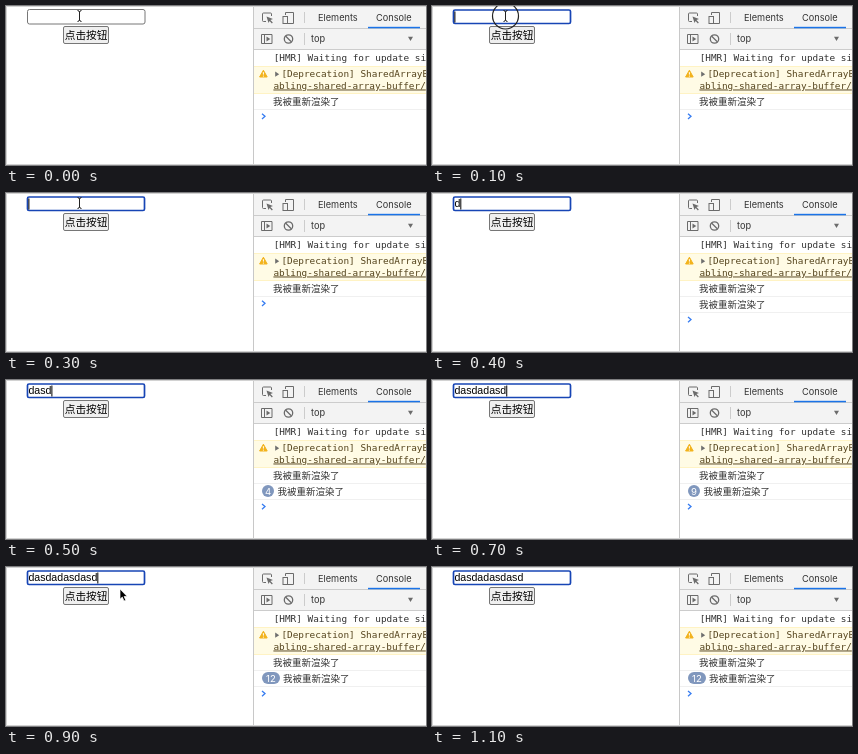
An HTML page for the animation above (1200 ms loop, 420 by 159 pixels).

```html
<!DOCTYPE html>
<html lang="zh">
<head>
<meta charset="utf-8">
<title>Input re-render demo</title>
<style>
  html, body { margin: 0; width: 100%; height: 100%; overflow: hidden; background: #fff; }
  svg { display: block; width: 420px; height: 159px; }
  text { white-space: pre; }
  .ui { font: 9.2px Inter, Roboto, sans-serif; fill: #333; }
  .mono { font: 9.4px "DejaVu Sans Mono", monospace; fill: #303030; }
  .log { font: 9.5px "Noto Sans CJK SC", "Noto Sans CJK", sans-serif; fill: #303030; }
  .button { font: 10.7px "Noto Sans CJK SC", "Noto Sans CJK", sans-serif; fill: #000; }
  .typed { font: 10.6px "Liberation Sans", Arial, sans-serif; fill: #000; }
  .count { font: 9.6px Inter, "Liberation Sans", sans-serif; fill: #fff; text-anchor: middle; }
  .icon { fill: none; stroke: #6b6b6b; stroke-width: 1; }
  .warn { fill: #54431c; }
</style>
</head>
<body>
<svg viewBox="0 0 420 159">
  <rect width="420" height="159" fill="#fff"/>

  <!-- Developer tools -->
  <rect x="248" width="172" height="43" fill="#f3f3f3"/>
  <path d="M248 22.5H420M248 43.5H420M298.5 6V17M298.5 27V39" stroke="#ccc" fill="none"/>
  <g class="icon">
    <path d="M260 15.5H257.5Q256.5 15.5 256.5 14.5V8Q256.5 7 257.5 7H264.5Q265.5 7 265.5 8V10"/>
    <path d="M260.5 10.5L267 13L264.4 14L266.8 16.6L265.9 17.4L263.6 14.9L262.5 17Z" fill="#6b6b6b" stroke="none"/>
    <path d="M279.5 9V6.5H287.5V17.5H281.5"/>
    <rect x="277" y="10.5" width="4.5" height="7"/>
    <path d="M255.5 28.5H266V37.5H255.5ZM258.5 28.5V37.5"/>
    <path d="M260.5 30.5L264.3 33L260.5 35.5Z" fill="#6b6b6b" stroke="none"/>
    <g stroke-width="1.3">
      <circle cx="282.5" cy="33" r="4.2"/>
      <path d="M279.5 30L285.5 36"/>
    </g>
  </g>
  <text class="ui" x="312" y="14.7">Elements</text>
  <text class="ui" x="370" y="14.7">Console</text>
  <rect x="362" y="20.8" width="52" height="1.5" fill="#1a73e8"/>
  <text class="ui" x="305" y="36">top</text>
  <path d="M402 30.7H407L404.5 35Z" fill="#6b6b6b"/>

  <text class="mono" x="267.7" y="55">[HMR] Waiting for update signal</text>
  <rect x="248" y="60" width="172" height="28" fill="#fffbe5"/>
  <path d="M248 60.5H420M248 87.5H420" stroke="#fff3c4"/>
  <path d="M257.4 64.2L261.2 71H253.6Z" fill="#f2b21b" stroke="#f2b21b" stroke-linejoin="round"/>
  <path d="M257.4 66.2V68.6M257.4 69.6V70.6" stroke="#fff"/>
  <path d="M269.2 65.6L273.2 68.2L269.2 70.8Z" fill="#6e6e6e"/>
  <text class="mono warn" x="275.4" y="71.3">[Deprecation] SharedArrayBuffer</text>
  <text class="mono warn" x="267.4" y="82.5" text-decoration="underline">abling-shared-array-buffer/</text>
  <text class="log" x="267" y="98.5">我被重新渲染了</text>
  <path d="M248 103.5H420" stroke="#f0f0f0"/>
  <g id="row">
    <rect id="badge" x="256" y="105" width="12" height="12" rx="6" fill="#8097bd"/>
    <text id="count" class="count" y="114.5"></text>
    <text id="log" class="log" y="114.5">我被重新渲染了</text>
    <path d="M248 119.5H420" stroke="#f0f0f0"/>
  </g>
  <path id="prompt" d="M256 107.7L259 110.3L256 112.9" fill="none" stroke="#367cf1" stroke-width="1.3"/>

  <!-- Page -->
  <rect id="field" fill="#fff"/>
  <text id="typed" class="typed" x="22.4" y="14.3"></text>
  <rect id="caret" y="5.5" width="1" height="11"/>
  <rect x="57.5" y="20.5" width="45" height="17" rx="1.5" fill="#efefef" stroke="#767676"/>
  <text class="button" x="58.7" y="33">点击按钮</text>
  <path d="M247.5 0V159" stroke="#c8c8c8"/>
  <path d="M0 .5H420M0 158.5H420M.5 0V159" stroke="#d2d2d2"/>

  <!-- Pointers -->
  <circle id="ring" cx="73.5" cy="10" r="13" fill="none" stroke="#222" stroke-width="1.2"/>
  <path id="beam" d="M71.5 4.5Q73.5 4.5 73.5 6.5Q73.5 4.5 75.5 4.5M73.5 6V14M71.5 15.5Q73.5 15.5 73.5 13.5Q73.5 15.5 75.5 15.5" fill="none" stroke="#222"/>
  <path id="arrow" d="M114 22V32.2L116.3 30.1L118 34L119.8 33.2L118.1 29.5H121.2Z" fill="#000" stroke="#fff" stroke-width=".7"/>
</svg>
<script>
  const STEP = 100, STEPS = 12;
  const PHRASE = "dasdadasdasd";
  const el = id => document.getElementById(id);
  const show = (id, on) => el(id).style.display = on ? "" : "none";
  const set = (id, attrs) => {
    for (const name in attrs) el(id).setAttribute(name, attrs[name]);
  };

  // Keystrokes start at step 4 and arrive about 2.75 per step.
  const typedAt = step => step < 4 ? 0 : Math.min(PHRASE.length, Math.round(1 + (step - 4) * 2.75));

  function drawField(step, n) {
    const focused = step > 0;
    set("field", focused
      ? { x: 21.5, y: 4, width: 117, height: 13.5, rx: 1.5, stroke: "#1745b5", "stroke-width": 1.7 }
      : { x: 21.5, y: 3.5, width: 117.5, height: 14.5, rx: 2, stroke: "#767676", "stroke-width": 1 });
    el("typed").textContent = PHRASE.slice(0, n);
    set("caret", { x: 22.4 + (n ? el("typed").getComputedTextLength() : 0) });
    show("caret", focused && step < 10);
  }

  function drawLog(n) {
    const wide = n > 9, grouped = n > 1;
    show("row", n > 0);
    show("badge", grouped);
    set("badge", { width: wide ? 18 : 12 });
    set("count", { x: wide ? 265 : 262 });
    el("count").textContent = grouped ? n : "";
    set("log", { x: wide ? 277 : grouped ? 271.5 : 267 });
    set("prompt", { transform: `translate(0 ${n ? 16.3 : 0})` });
  }

  function draw(step) {
    const n = typedAt(step);
    drawField(step, n);
    drawLog(n);
    show("beam", step < 4);
    show("ring", step === 1 || step === 2);
    show("arrow", step === 9);
  }

  const start = performance.now();
  function tick() {
    draw(Math.floor((performance.now() - start) / STEP) % STEPS);
    requestAnimationFrame(tick);
  }
  tick();
</script>
</body>
</html>
```
